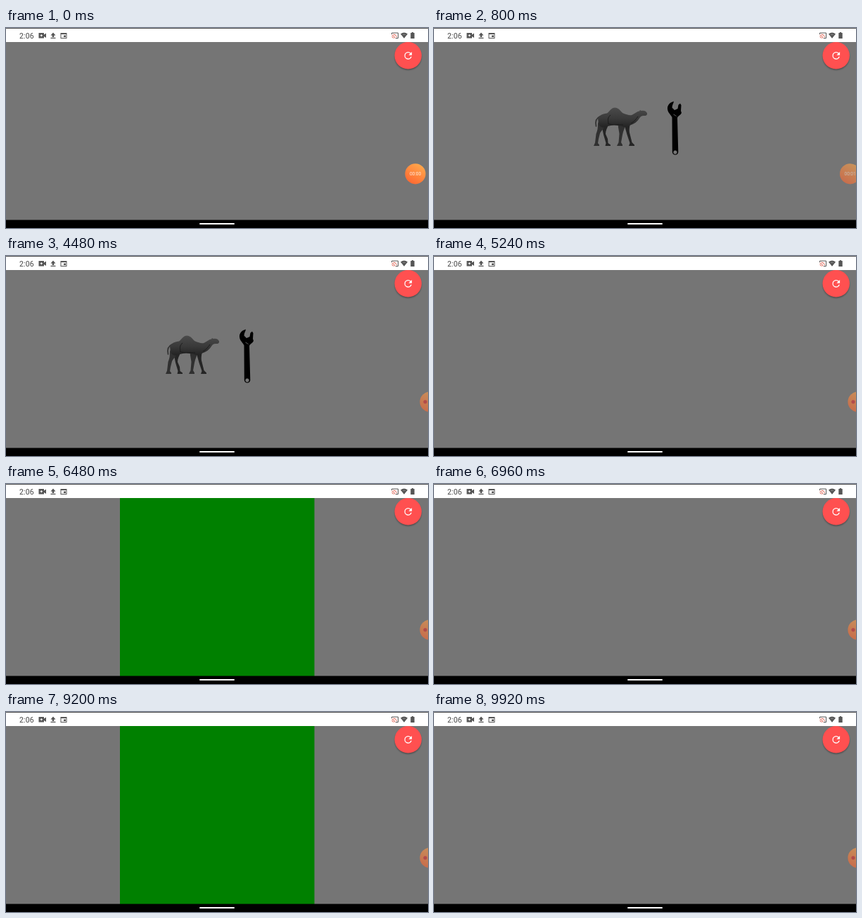
These frames come from a looping animation (600x285 px, 10000 ms). An HTML page:

```html
<!DOCTYPE html>
<html lang="en">
<head>
<meta charset="utf-8">
<title>Flash cards</title>
<style>
  html, body { margin: 0; width: 100%; height: 100%; overflow: hidden; background: #757575; }
  svg { display: block; width: 600px; height: 285px; }
  text { font-family: Roboto, sans-serif; }
</style>
</head>
<body>
<svg viewBox="0 0 600 285">
  <defs>
    <linearGradient id="orange" x1="0.8" y1="0" x2="0.2" y2="1">
      <stop offset="0" stop-color="#ffab4d"/>
      <stop offset="1" stop-color="#ff6530"/>
    </linearGradient>
    <linearGradient id="hide" x1="0" y1="0" x2="0" y2="1">
      <stop offset="0" stop-color="#4a4a4a"/>
      <stop offset="0.55" stop-color="#393939"/>
      <stop offset="1" stop-color="#222"/>
    </linearGradient>
    <filter id="soft" x="-30%" y="-30%" width="160%" height="160%">
      <feGaussianBlur stdDeviation="1.3"/>
    </filter>
  </defs>
  <rect width="600" height="285" fill="#757575"/>

  <g id="pair">
    <!-- camel -->
    <g fill="#252525">
      <path d="M238 137L248 138C246 143 244 146 244 151L247 158L247.500 164L251 166.500V168H243.500L244.500 164L241 152Z"/>
      <path d="M270 136L279 135C278 142 277 146 278.500 151L281.500 163L285 166.500V168H277L278.500 164L274.500 152Z"/>
    </g>
    <path fill="none" stroke="#333" stroke-width="1.700" stroke-linecap="round" d="M236 126C231 128 229 133 230.500 140"/>
    <path fill="#303030" d="M235 131L246 135C243 142 238 146 236 150L234 158L233 164L235 166.500V168H227L229 163.500L230.500 151C233 145 233 141 233 136Z"/>
    <path fill="#303030" d="M262 134L274 136C271 142 269 147 268 152L266 163L268 166.500V168H260L262.500 163L263.500 151C263 145 261 140 262 134Z"/>
    <path fill="url(#hide)" d="M233 129C235 124 241 122 246 121.500C250 119 252 113.500 257 113.500C263 113.500 265 119 269 121.500C273 123 278 125 281 124C286 122 288 119 292 118.500L293 117L295 118C299 117 302 119 303 121.500C303.500 124 301 125.500 298 125C295 125 294 126 292.500 128C289 134 284 137 279 138.500C276 142 271 142 267 140C260 138 253 138 247 140C242 143 236 142 234 137Z"/>
    <path fill="none" stroke="#1c1c1c" d="M247 136C254 139 262 137 269 138M280 136C285 133 288 129 290 126M251 124C247 127 247 131 248 136"/>

    <!-- wrench -->
    <path fill-rule="evenodd" d="M341 104.500C335 106 331.500 110.500 332 115.500C332.500 121 337 123.500 338.500 127.500L338.800 177A4.300 4.300 0 0 0 347.300 177L346 128C347 125 350 124.500 351 122.500L352 121L351 118L351.500 110L350 107.500L347.500 109.500L346.500 115L342 117L338.500 113.500C338.500 110 340.500 107.500 341 104.500ZM343 174.500A2.600 2.600 0 1 1 342.900 174.500Z"/>
    <path d="M340.500 123L344.500 125.500" stroke="#777" stroke-width="0.800"/>
  </g>

  <rect id="flash" x="162" y="20" width="276.500" height="254" fill="#008000"/>

  <!-- status bar -->
  <rect width="600" height="20" fill="#fff"/>
  <rect width="600" height="1" fill="#555"/>
  <text x="19" y="14.800" font-size="10.500" letter-spacing="0.150" fill="#444">2:06</text>
  <g fill="#555">
    <path d="M46.500 7H54V9.500L57 7.500V14L54 12V14.500H46.500Z"/>
    <path d="M67 6.500L70.500 10.500H68.300V13H65.700V10.500H63.500ZM63.500 13.800H70.500V15H63.500Z"/>
    <path fill-rule="evenodd" d="M77.500 7H86.500V15H77.500ZM78.500 9V14H85.500V9ZM82 10.500H85V13H82Z"/>
    <path d="M561 8.500Q566 4.500 571 8.500L566 14.800Z"/>
    <path d="M576.800 6H579.200V7H580.700V15H575.300V7H576.800Z"/>
  </g>
  <path d="M564 9.700Q566 8.400 568 9.700" fill="none" stroke="#aaa" stroke-width="0.600"/>
  <path d="M50.300 9V12.400M48.600 10.700H52" stroke="#fff"/>
  <path d="M548.500 9V7H557.500V14.500H554" fill="none" stroke="#555"/>
  <path d="M548.500 10.200Q552.500 10.500 553 14.700M548.500 12.300Q550.500 12.500 550.800 14.700M550.500 8.700Q555 9.500 555.500 13" fill="none" stroke="#e06050"/>

  <!-- refresh button -->
  <circle cx="571.700" cy="41" r="18.800" fill="#000" opacity="0.400" filter="url(#soft)"/>
  <circle cx="571.700" cy="39.300" r="19.200" fill="#ff5050"/>
  <path transform="translate(563.700 31.300) scale(0.670)" fill="#fff" d="M17.650 6.350A8 8 0 1 0 19.730 14H17.650A6 6 0 1 1 12 6C13.660 6 15.140 6.690 16.220 7.780L13 11H20V4Z"/>

  <!-- recorder bubble -->
  <g id="bubble">
    <circle r="14.600" fill="url(#orange)"/>
    <text id="clock" y="2.300" font-size="6.500" text-anchor="middle" fill="#fff" opacity="0.850"></text>
    <circle id="dot" cx="-7" r="2.600" fill="#dc3030"/>
  </g>

  <!-- navigation bar -->
  <rect y="273.500" width="600" height="12" fill="#000"/>
  <rect x="275" y="278" width="50" height="2" rx="1" fill="#fff"/>
</svg>
<script>
  const LOOP = 10000, FADE = 680;
  // each round: pictures start to appear, flash on, flash off
  const rounds = [
    [280, 1200, 1520],
    [1960, 3000, 3280],
    [3800, 4680, 4960],
    [5520, 6440, 6680],
    [8120, 9160, 9480]
  ];
  const ticks = [60, 1200, 2640, 3280];
  const $ = id => document.getElementById(id);
  const pair = $("pair"), flash = $("flash"), bubble = $("bubble"), clock = $("clock"), dot = $("dot");
  const ramp = (t, from, len) => Math.min(1, Math.max(0, (t - from) / len));

  function draw(t) {
    const round = rounds.find(([start, , off]) => t >= start && t < off);
    const flashing = round && t >= round[1];
    const shown = round && !flashing ? 1 - (1 - ramp(t, round[0], FADE)) ** 3 : 0;
    pair.setAttribute("opacity", shown);
    flash.setAttribute("visibility", flashing ? "visible" : "hidden");

    const slide = ramp(t, 280, FADE), dock = ramp(t, 3800, FADE);
    const x = 582 + 12.5 * slide + 8.5 * dock;
    bubble.setAttribute("transform", `translate(${x} 207.8)`);
    bubble.setAttribute("opacity", 1 - 0.4 * ramp(t, 280, 400));
    clock.textContent = "00:0" + Math.max(0, ticks.filter(s => t >= s).length - 0);
    clock.setAttribute("opacity", 0.85 * (1 - ramp(dock, 0, 0.5)));
    dot.setAttribute("opacity", ramp(dock, 0.5, 0.5));
  }

  function frame() {
    draw(performance.now() % LOOP);
    requestAnimationFrame(frame);
  }
  frame();
</script>
</body>
</html>
```
